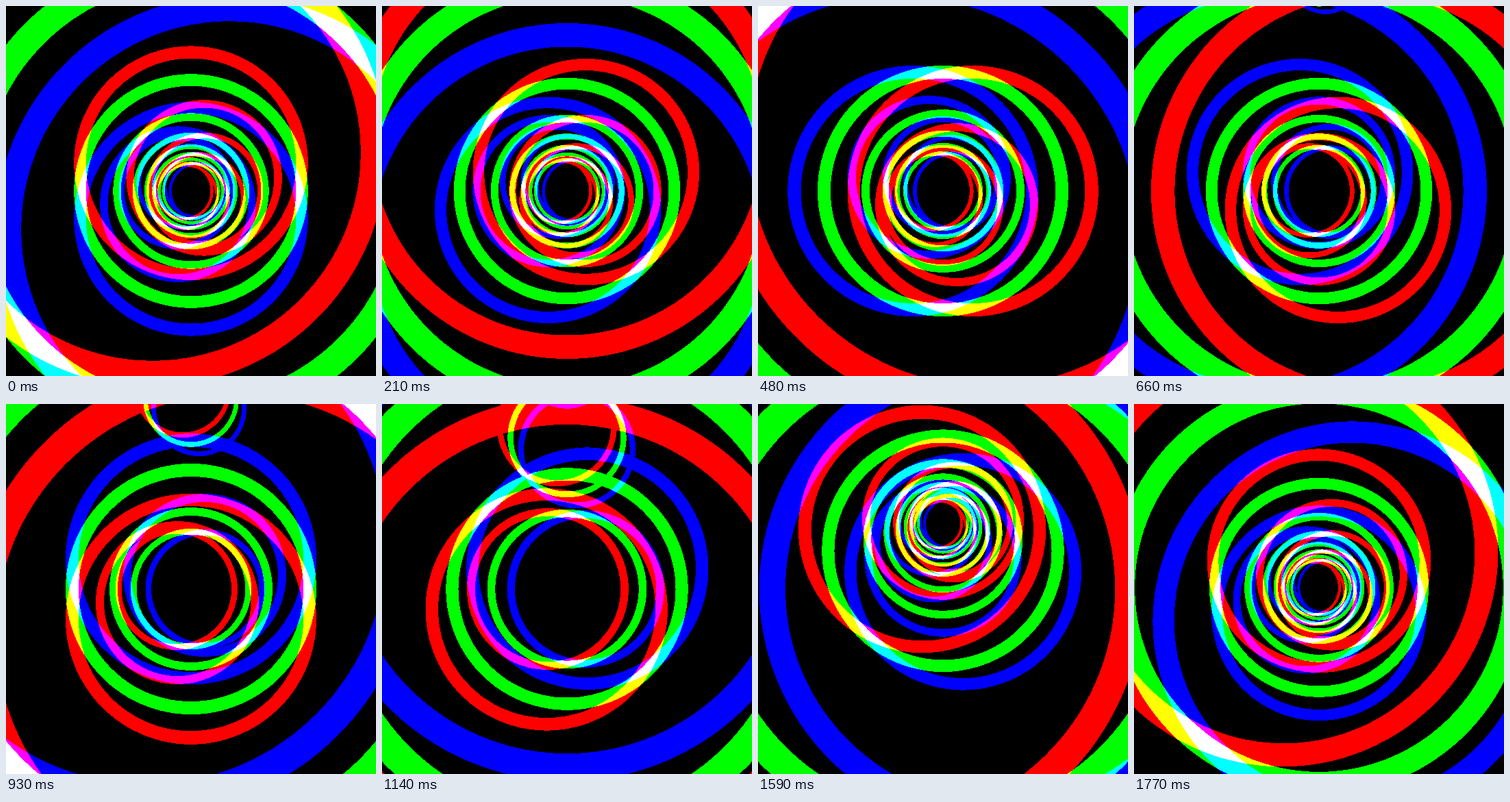
An HTML page with a canvas for the animation above (1800 ms loop, 540 px wide and 540 px high).

```html
<!DOCTYPE html>
<html>
<head>
<meta charset="utf-8">
<style>
html, body { margin: 0; width: 100%; height: 100%; overflow: hidden; background: #000; }
canvas { display: block; }
</style>
</head>
<body>
<canvas id="stage" width="540" height="540"></canvas>
<script>
const ctx = document.getElementById('stage').getContext('2d', { willReadFrequently: true });
const SIZE = 540, MID = SIZE / 2;
const LOOP = 1800, STEP = 30;
const RINGS = 8;      // rings passed per loop
const SCALE = 324;    // ring radius at depth 1
const TUBE = 0.051;   // tube radius relative to the ring radius
const FOCAL = 468;    // camera focal length in pixels
const SPLIT = 0.25;   // colour offset relative to the ring radius
const TILT = 8.78;    // rise per ring of the next tunnel before it swings down
const SPREAD = 0.042; // depth difference between colours in the next tunnel
const COLORS = [['#f00', 1], ['#0f0', 0], ['#00f', -1]];

const smooth = u => u * u * (3 - 2 * u);

// One outline of a torus seen in perspective; the tube looks wider off axis.
function outline(x, y, r, side) {
  const n = 240;
  for (let i = 0; i < n; i++) {
    const a = i / n * 2 * Math.PI, c = Math.cos(a), s = Math.sin(a);
    const reach = r + x * c + y * s;
    const edge = r + side * TUBE * r * Math.hypot(1, reach / FOCAL);
    ctx.lineTo(MID + x + edge * c, MID + y + edge * s);
  }
  ctx.closePath();
}

function drawTorus(x, y, r, color) {
  ctx.fillStyle = color;
  ctx.beginPath();
  outline(x, y, r, 1);
  ctx.moveTo(MID + x + r, MID + y);
  ctx.beginPath();
  const ring = [1, -1];
  for (const side of ring) {
    const sub = side;
    traceFrom(x, y, r, sub);
  }
  ctx.fill('evenodd');
}

function traceFrom(x, y, r, side) {
  const edge = r + side * TUBE * r * Math.hypot(1, (r + x) / FOCAL);
  ctx.moveTo(MID + x + edge, MID + y);
  outline(x, y, r, side);
}

function drawRing(k, t) {
  const ahead = Math.max(0, k - RINGS);
  const rise = TILT * smooth(1 - t) * ahead;
  const angle = (k + 4) * Math.PI / 4;
  for (const [color, side] of COLORS) {
    const z = k - RINGS * t - (k >= RINGS ? SPREAD * side : 0);
    if (z < 0.3) continue;
    const r = SCALE / z;
    const x = r * SPLIT * side * Math.cos(angle);
    const y = r * (SPLIT * side * Math.sin(angle) - rise);
    drawTorus(x, y, r, color);
  }
}

// Hard edges: every channel is fully on or off.
function crisp() {
  const image = ctx.getImageData(0, 0, SIZE, SIZE), d = image.data;
  for (let i = 0; i < d.length; i++) d[i] = d[i] > 127 ? 255 : 0;
  ctx.putImageData(image, 0, 0);
}

function draw(now) {
  const t = Math.floor(now % LOOP / STEP) * STEP / LOOP;
  ctx.globalCompositeOperation = 'source-over';
  ctx.fillStyle = '#000';
  ctx.fillRect(0, 0, SIZE, SIZE);
  ctx.globalCompositeOperation = 'lighter';
  for (let k = 1; k <= 2 * RINGS; k++) drawRing(k, t);
  crisp();
}

const start = performance.now();
function tick() {
  draw(performance.now() - start);
  requestAnimationFrame(tick);
}
tick();
</script>
</body>
</html>
```
